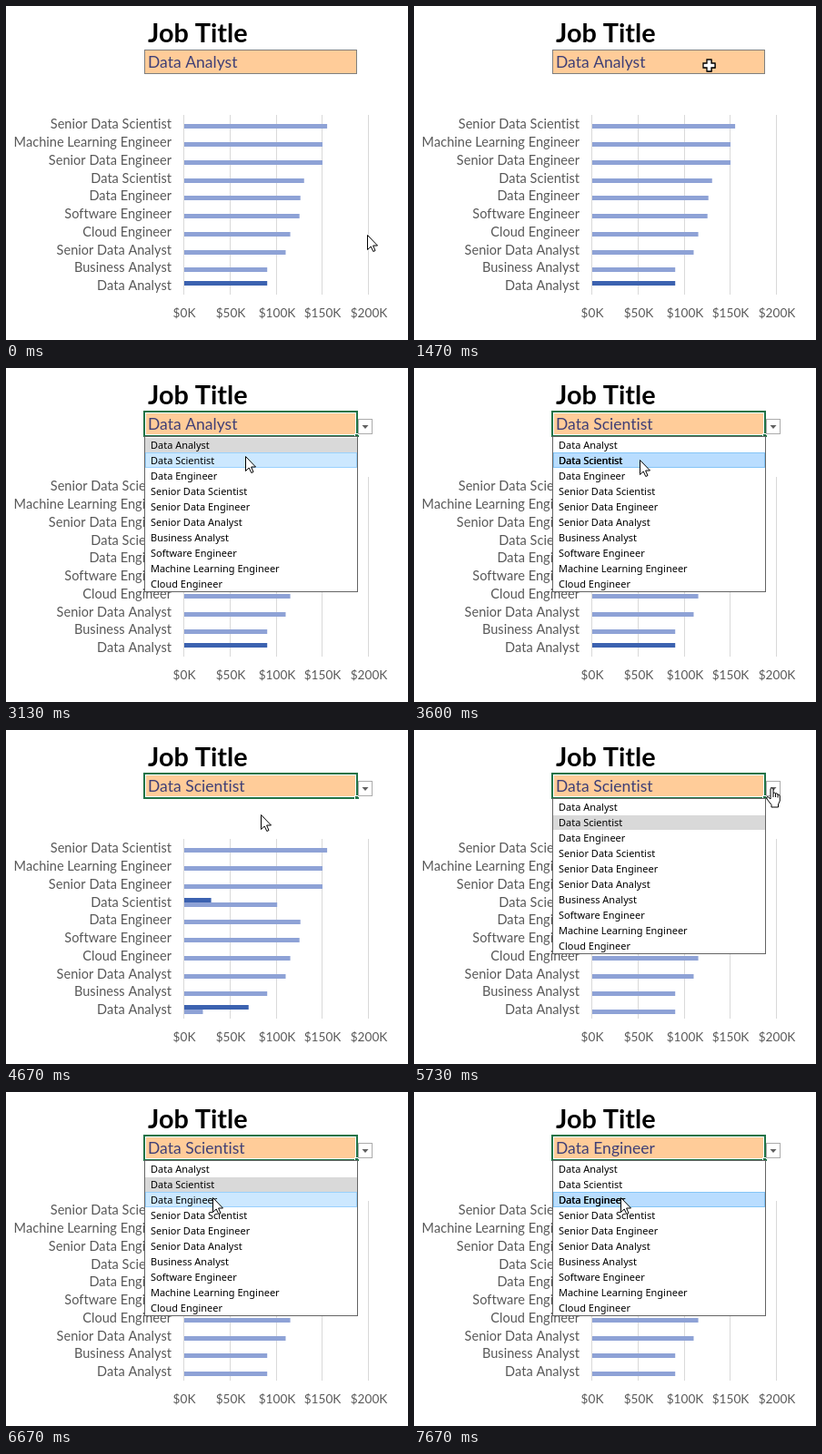
Recreate the animation shown at these times as an HTML page with a canvas. Size 442x368 px, loop 8000 ms.

```html
<!DOCTYPE html>
<html lang="en">
<head>
<meta charset="utf-8">
<title>Job title picker</title>
<style>
  html, body { margin: 0; width: 100%; height: 100%; overflow: hidden; background: #fff; }
  canvas { display: block; }
</style>
</head>
<body>
<canvas id="stage" width="442" height="368"></canvas>
<script>
const ctx = document.getElementById('stage').getContext('2d', { alpha: false });
const LOOP = 8000, TICK = 1000 / 15;

const chart = [
  ['Senior Data Scientist', 155], ['Machine Learning Engineer', 150],
  ['Senior Data Engineer', 150], ['Data Scientist', 130],
  ['Data Engineer', 126], ['Software Engineer', 125],
  ['Cloud Engineer', 115], ['Senior Data Analyst', 110],
  ['Business Analyst', 90], ['Data Analyst', 90]
];
const options = [
  'Data Analyst', 'Data Scientist', 'Data Engineer', 'Senior Data Scientist',
  'Senior Data Engineer', 'Senior Data Analyst', 'Business Analyst',
  'Software Engineer', 'Machine Learning Engineer', 'Cloud Engineer'
];

// Pointer moves: start tick, end tick, target x, target y
const moves = [
  [0, 7, 345, 60], [14, 17, 330, 65], [21, 22, 324, 65], [27, 28, 326, 79],
  [30, 35, 391, 66], [41, 49, 248, 101], [69, 76, 392, 64], [92, 100, 227, 116]
];

const arrow = new Path2D('M.5 .5V16.5L4.2 13L6.8 18.5L9 17.5L6.6 12H11.5Z');
const cross = new Path2D('M-2.5-6.5H2.5V-2.5H6.5V2.5H2.5V6.5H-2.5V2.5H-6.5V-2.5H-2.5Z');
const hand = new Path2D('M5 2Q6.5-.5 8 2V6.5Q9.5 5 10.5 7Q12 6 13 8Q15 7.5 15.3 10V15L13.5 19V22H6V19.5L1 13Q0 10.5 2 10.5L5 13Z');
const knuckles = new Path2D('M8 6.5V11M10.5 7V11M13 8V11.5');

const ease = u => 1 - (1 - Math.min(1, Math.max(0, u))) ** 1.65;

function pointerAt(k) {
  let x = 397, y = 252;
  for (const [start, end, tx, ty] of moves) {
    const p = ease((k - start) / (end - start));
    x += (tx - x) * p;
    y += (ty - y) * p;
  }
  return [Math.round(x), Math.round(y)];
}

function rect(x, y, w, h, fill) {
  ctx.fillStyle = fill;
  ctx.fillRect(x, y, w, h);
}

function frame(x, y, w, h, color, width = 1) {
  ctx.strokeStyle = color;
  ctx.lineWidth = width;
  ctx.strokeRect(x, y, w, h);
}

function text(str, x, y, font, color, align = 'left') {
  ctx.font = font;
  ctx.letterSpacing = '0.02px'; // turns ligatures off
  ctx.fillStyle = color;
  ctx.textAlign = align;
  ctx.fillText(str, x, y);
}

function drawChart(k) {
  const swap = ease((k - 69) / 7), scale = 1.0135;
  for (let i = 0; i < 5; i++) {
    const x = 195 + Math.round(i * 50.75);
    rect(x, 120, 1, 198, '#d9d9d9');
    text(`$${i * 50}K`, x + 1, 343, '13.6px Lato, sans-serif', '#595959', 'center');
  }
  chart.forEach(([name, value], i) => {
    const mid = Math.round(120.45 + 19.75 * (i + 0.5));
    const dark = name === 'Data Analyst' ? 1 - swap : name === 'Data Scientist' ? swap : 0;
    rect(196, mid, value * scale * (1 - dark), 5, '#8ea2d6');
    rect(196, mid - 5, value * scale * dark, 5, '#3c62b0');
    text(name, 182, mid + 5, '14.55px Lato, sans-serif', '#595959', 'right');
  });
}

function drawCell(value, selected) {
  text('Job Title', 156, 40, 'bold 28.8px Lato, sans-serif', '#000');
  rect(152, 48, 234, 27, '#ffcc99');
  if (selected) {
    frame(153.5, 49.5, 231, 24, '#fff');
    frame(152, 48, 234, 27, '#217346', 2);
    rect(383, 72, 5, 5, '#fff');
    rect(384, 73, 4, 3, '#217346');
    rect(387, 56, 16, 18, '#fff');
    frame(387.5, 56.5, 15, 16, '#ababab');
    ctx.fillStyle = '#606060';
    ctx.fill(new Path2D('M391.5 63H398.5L395 67Z'));
  } else {
    frame(152.5, 48.5, 233, 26, '#7f7f7f');
  }
  text(value, 156, 68, '17.5px Lato, sans-serif', '#3f3f76');
}

function drawList(current, hovered, pressed) {
  rect(152, 75, 235, 172, '#fff');
  frame(152.5, 75.5, 234, 171, '#646464');
  options.forEach((name, i) => {
    const y = 76 + 17 * i;
    if (i === hovered) {
      rect(153, y, 233, 17, pressed ? '#b9ddff' : '#cce8ff');
      frame(153.5, y + 0.5, 232, 16, pressed ? '#84c5f7' : '#99d1ff');
    } else if (i === current && !pressed) {
      rect(153, y + 1, 233, 16, '#d9d9d9');
    }
    text(name, 159, y + 13, '10.95px "Noto Sans", sans-serif', '#000');
    if (i === hovered && pressed) ctx.fillText(name, 159.3, y + 13);
  });
}

function drawPointer(kind, x, y) {
  const outline = (path, width = 1) => {
    ctx.lineWidth = width;
    ctx.fill(path);
    ctx.stroke(path);
  };
  ctx.save();
  ctx.fillStyle = '#fff';
  ctx.strokeStyle = '#000';
  if (kind === 'arrow') {
    ctx.translate(x, y);
    outline(arrow);
  } else if (kind === 'hand') {
    ctx.translate(x - 5, y - 1);
    outline(hand);
    ctx.stroke(knuckles);
  } else {
    ctx.translate(x + 1, y + 1);
    ctx.fillStyle = '#000';
    ctx.fill(cross);
    ctx.translate(-0.5, -0.5);
    ctx.fillStyle = '#fff';
    outline(cross, 1.3);
  }
  ctx.restore();
}

function draw(ms) {
  const k = Math.floor((ms + 5) / TICK);
  const [x, y] = pointerAt(k);
  const current = k < 54 ? 0 : k < 115 ? 1 : 2;
  const open = (k >= 38 && k < 67) || k >= 86;
  const pressed = (k >= 53 && k < 67) || k >= 113;
  const hovered = x < 386 && y >= 76 ? Math.floor((y - 76) / 17) : -1;
  const kind = k < 20 ? 'arrow' : x >= 386 ? 'hand' : k < 38 ? 'cross' : 'arrow';

  rect(0, 0, 442, 368, '#fff');
  drawChart(k);
  drawCell(options[current], k >= 28);
  if (open) drawList(current, hovered, pressed);
  drawPointer(kind, x, y);
}

const begin = performance.now();
function loop() {
  draw((performance.now() - begin) % LOOP);
  requestAnimationFrame(loop);
}
loop();
</script>
</body>
</html>
```
